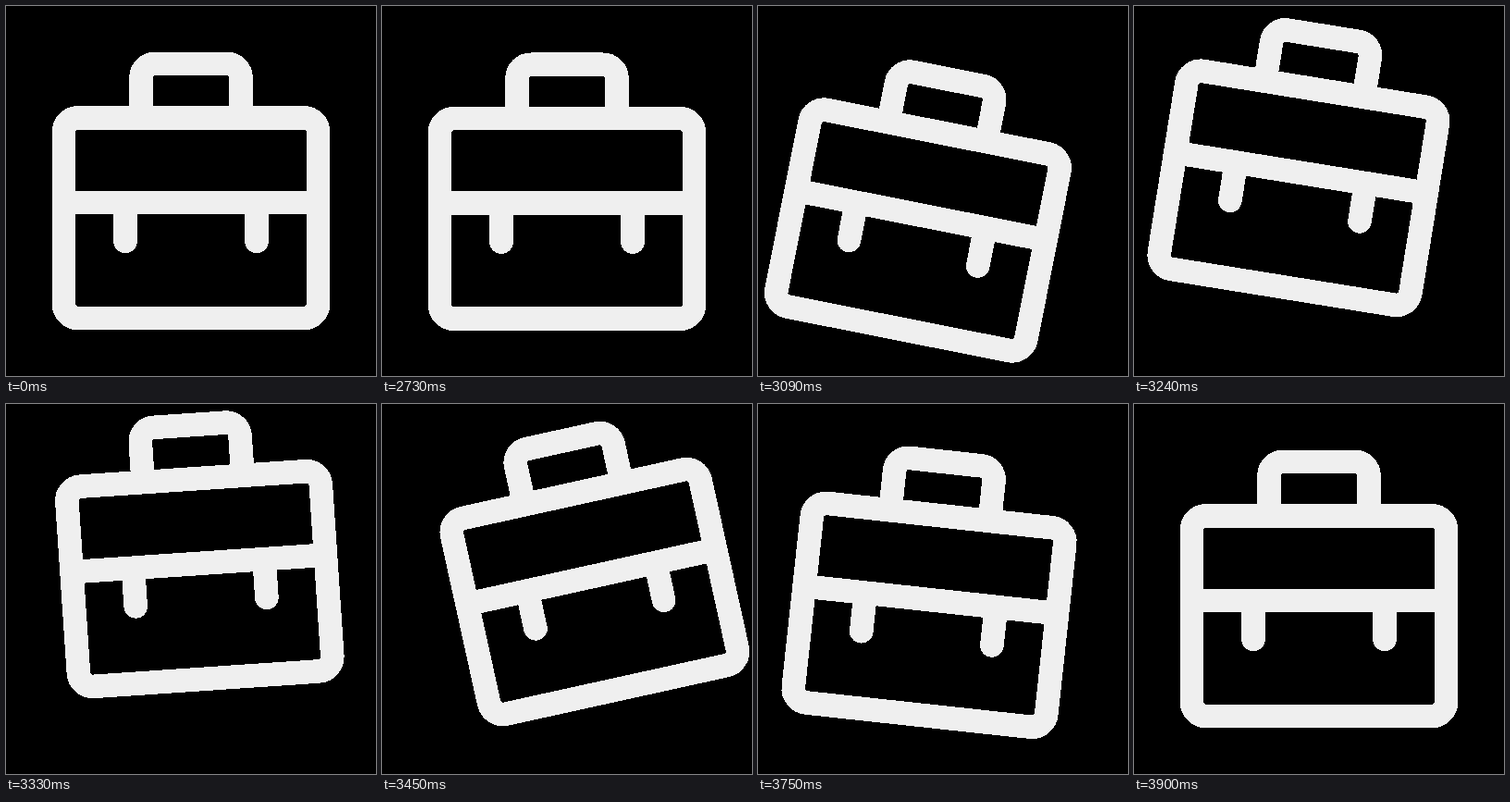
Recreate the animation shown at these times as an HTML page. Size 400 by 400 pixels, loop 3930 ms.

```html
<!DOCTYPE html>
<html lang="en">
<head>
<meta charset="utf-8">
<title>Swinging briefcase</title>
<style>
  html, body { margin: 0; width: 100%; height: 100%; overflow: hidden; background: #000; }
  svg { display: block; width: 100%; height: 100%; }
  #bag { fill: none; stroke: #efefef; stroke-width: 25.6; shape-rendering: crispEdges; }
</style>
</head>
<body>
<svg viewBox="0 0 400 400">
  <g id="bag">
    <rect x="62.5" y="120.8" width="275" height="216.7" rx="15.5"/>
    <path d="M62.5 212.5H337.5"/>
    <path d="M146 121V77.5a15 15 0 0 1 15-15H239a15 15 0 0 1 15 15V121"/>
    <path d="M129 212.5V254.3M271 212.5V254.3" stroke-linecap="round"/>
  </g>
</svg>
<script>
  const LOOP = 3930, STEP = 30;
  const PIVOT = { x: 200, y: 90 };

  // [time in ms, value]
  const lift = [[2700, 0], [3005, 29], [3312, -40.2], [3616, 0]];
  const swing = [[2768, 0], [3181, 12.8], [3430, -13], [3641, 10], [3900, 0]];

  const ease = p => p * p * (3 - 2 * p);

  function valueAt(keys, t) {
    if (t <= keys[0][0]) return keys[0][1];
    for (let i = 1; i < keys.length; i++) {
      const [t0, a] = keys[i - 1], [t1, b] = keys[i];
      if (t < t1) return a + (b - a) * ease((t - t0) / (t1 - t0));
    }
    return keys[keys.length - 1][1];
  }

  const bag = document.getElementById('bag');

  function draw() {
    const t = Math.floor((performance.now() % LOOP) / STEP) * STEP;
    const y = valueAt(lift, t).toFixed(2);
    const angle = valueAt(swing, t).toFixed(3);
    bag.setAttribute('transform', `translate(0 ${y}) rotate(${angle} ${PIVOT.x} ${PIVOT.y})`);
    requestAnimationFrame(draw);
  }
  draw();
</script>
</body>
</html>
```
